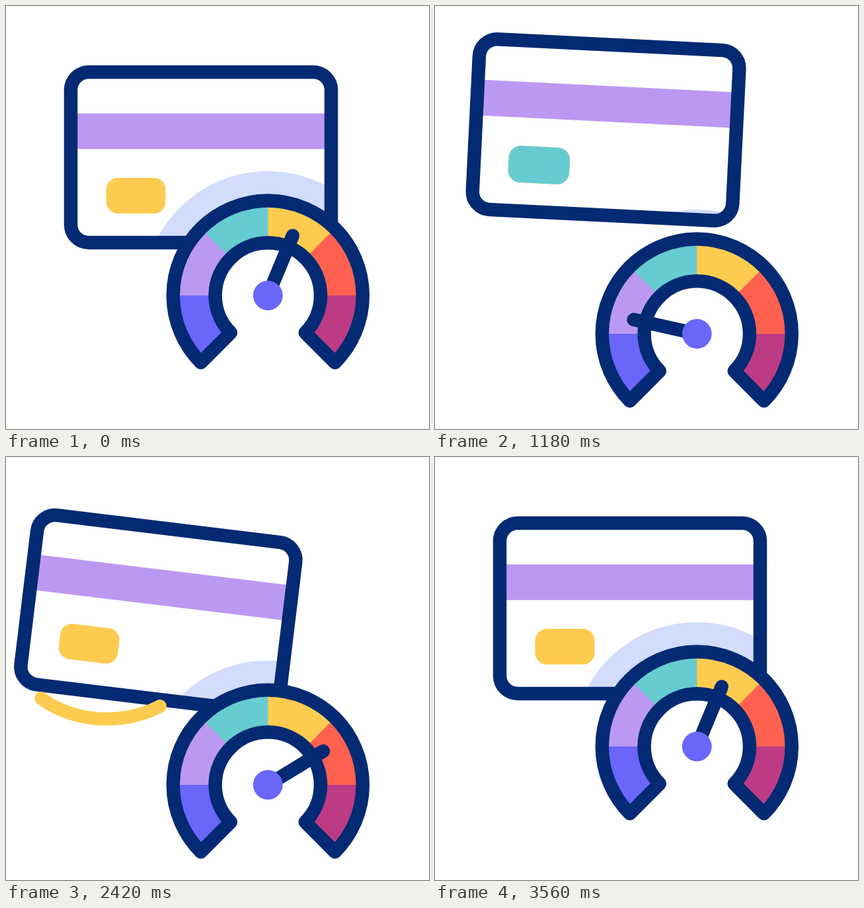
An HTML page with a canvas for the animation above (3600 ms loop, 640 px wide and 640 px high).

```html
<!DOCTYPE html>
<html lang="en">
<head>
<meta charset="utf-8">
<title>Card and gauge</title>
<style>
html, body { margin: 0; width: 100%; height: 100%; overflow: hidden; background: #fff; }
canvas { display: block; width: 100vw; height: 100vh; object-fit: contain; }
</style>
</head>
<body>
<canvas id="stage" width="640" height="640"></canvas>
<script>
const ctx = document.getElementById('stage').getContext('2d');
const LOOP = 3600, SWING = 1550, TAU = Math.PI * 2, DEG = Math.PI / 180;
const NAVY = '#032a73', BLUE = '#6966f9', LILAC = '#bb99f2', TEAL = '#67ccd1',
      YELLOW = '#fdcb50', RED = '#ff6150', PLUM = '#bc3b84', HALO = '#d2dcfd';

const clamp = v => Math.max(0, Math.min(1, v));
const ramp = (t, a, b) => clamp((t - a) / (b - a));
const ease = s => s * s * (3 - 2 * s);
const easeOut = s => 1 - (1 - s) * (1 - s);
const mix = (a, b, k) => a + (b - a) * k;

// Monotone cubic through keys [time, value, ...], read at column c
function curve(keys, t, c = 1) {
  const last = keys.length - 1;
  if (t <= keys[0][0]) return keys[0][c];
  if (t >= keys[last][0]) return keys[last][c];
  const slope = i => (keys[i + 1][c] - keys[i][c]) / (keys[i + 1][0] - keys[i][0]);
  const tangent = i => {
    if (i === 0 || i === last) return 0;
    const a = slope(i - 1), b = slope(i);
    return a * b <= 0 ? 0 : 2 * a * b / (a + b);
  };
  let i = 0;
  while (t > keys[i + 1][0]) i++;
  const d = keys[i + 1][0] - keys[i][0], s = (t - keys[i][0]) / d, e = ease(s);
  return mix(keys[i][c], keys[i + 1][c], e)
    + d * s * (1 - s) * ((1 - s) * tangent(i) - s * tangent(i + 1));
}

// time, x, y, degrees
const swing = [
  [520, 388, 196, 0], [740, 294.7, 275, 4.1], [870, 230.5, 237, 6.9],
  [920, 227, 222, 7.1], [1000, 228, 202, 6.3], [1100, 238, 190, 4.6],
  [1180, 258.3, 187.5, 2.85], [1240, 282, 187, 1.7], [1350, 330, 189.5, 0]
];
const cardKeys = [
  [180, 295, 229, 0], [430, 390, 192, 0], ...swing,
  [1600, 389, 191.8, 0], [1660, 390, 192, 0], [1980, 390, 192, 0],
  ...swing.map(([t, ...pose]) => [t + SWING, ...pose]),
  [3020, 336, 187.5, 0], [3400, 306, 217, 0], [3560, 295, 229, 0]
];
const needleKeys = [
  [180, 22.5], [740, -90.5], [890, -108], [1180, -77.5], [1660, -27],
  [2420, 58.5], [2840, 125.5], [2910, 125.5], [3560, 22.5]
];

function gaugeY(t) {
  const dip = ease(ramp(t, 1800, 2080)) - ease(ramp(t, 2100, 2430));
  return 438 + 58 * (ease(ramp(t, 396, 896)) - ease(ramp(t, 2900, 3520))) - 5 * dip;
}

function disc(x, y, r, color) {
  ctx.fillStyle = color;
  ctx.beginPath();
  ctx.arc(x, y, r, 0, TAU);
  ctx.fill();
}

function box(x, y, w, h, r) {
  ctx.beginPath();
  ctx.roundRect(x, y, w, h, r);
}

function pen(color, width) {
  ctx.strokeStyle = color;
  ctx.lineWidth = width;
  ctx.lineCap = ctx.lineJoin = 'round';
}

function drawChip(t) {
  const pulse = p => ramp(p, 1040, 1120) - ramp(p, 1400, 1480);
  const k = pulse(t) + pulse(t - SWING), s = 1 + 0.03 * k;
  ctx.save();
  ctx.translate(-98.5, 58);
  ctx.scale(s, s);
  box(-45, -27, 90, 54, 18);
  ctx.fillStyle = YELLOW;
  ctx.fill();
  ctx.globalAlpha = k;
  ctx.fillStyle = TEAL;
  ctx.fill();
  ctx.restore();
}

function drawCard(t, gy) {
  const x = curve(cardKeys, t), y = curve(cardKeys, t, 2), turn = curve(cardKeys, t, 3) * DEG;
  const outline = () => box(-197, -129, 394, 258, 27);
  ctx.save();
  ctx.translate(x, y);
  ctx.rotate(turn);
  outline();
  ctx.save();
  ctx.clip();
  ctx.fillStyle = '#fff';
  ctx.fillRect(-200, -130, 400, 260);
  ctx.fillStyle = LILAC;
  ctx.fillRect(-197, -66.5, 394, 54);
  ctx.rotate(-turn);
  ctx.translate(-x, -y);
  disc(396, gy, 188, HALO);
  ctx.restore();
  drawChip(t);
  outline();
  pen(NAVY, 20.5);
  ctx.stroke();
  ctx.restore();
}

function drawSwoosh(t) {
  const head = easeOut(ramp(t, 560, 790)), tail = ease(ramp(t, 880, 1070));
  if (head <= 0 || tail >= 1) return;
  const at = (s, a, b, c, d) => {
    const u = 1 - s;
    return u * u * u * a + 3 * u * u * s * b + 3 * u * s * s * c + s * s * s * d;
  };
  ctx.beginPath();
  for (let i = 0; i <= 30; i++) {
    const s = mix(tail, head, i / 30);
    ctx.lineTo(at(s, 233, 180, 106, 53), at(s, 377, 405, 404, 365));
  }
  pen(YELLOW, 20);
  ctx.stroke();
}

function drawGauge(t, gy) {
  const start = 135 * DEG, inner = 79.7, outer = 143.5, step = 45 * DEG;
  const ring = (a, b) => {
    ctx.beginPath();
    ctx.arc(0, 0, outer, a, b);
    ctx.arc(0, 0, inner, b, a, true);
    ctx.closePath();
  };
  ctx.save();
  ctx.translate(396.3, gy);
  [PLUM, RED, YELLOW, TEAL, LILAC, BLUE].forEach((color, i) => {
    // Each wider ring section is covered by the next one, leaving no seams
    ring(start, start + step * (6 - i));
    ctx.fillStyle = color;
    ctx.fill();
  });
  ring(start, start + step * 6);
  pen(NAVY, 20.5);
  ctx.stroke();

  const a = curve(needleKeys, t) * DEG;
  ctx.beginPath();
  ctx.moveTo(0, 0);
  ctx.lineTo(98 * Math.sin(a), -98 * Math.cos(a));
  pen(NAVY, 20.5);
  ctx.stroke();
  disc(0, 0, 22.4, BLUE);
  ctx.restore();
}

function drawSparks(t) {
  const out = easeOut(ramp(t, 2680, 2850)), size = out * (1 - ease(ramp(t, 2920, 3080)));
  if (size <= 0) return;
  for (const [x, y] of [[601, 459], [584.5, 520], [538, 568]])
    disc(mix(500, x, out), mix(530, y, out), 10.6 * size, YELLOW);
}

function draw(t) {
  const gy = gaugeY(t);
  ctx.fillStyle = '#fff';
  ctx.fillRect(0, 0, 640, 640);
  drawCard(t, gy);
  drawSwoosh(t);
  drawSwoosh(t - SWING);
  drawGauge(t, gy);
  drawSparks(t);
}

const begin = performance.now();
function tick(now) {
  draw(Math.max(0, now - begin) % LOOP);
  requestAnimationFrame(tick);
}
draw(0);
requestAnimationFrame(tick);
</script>
</body>
</html>
```
